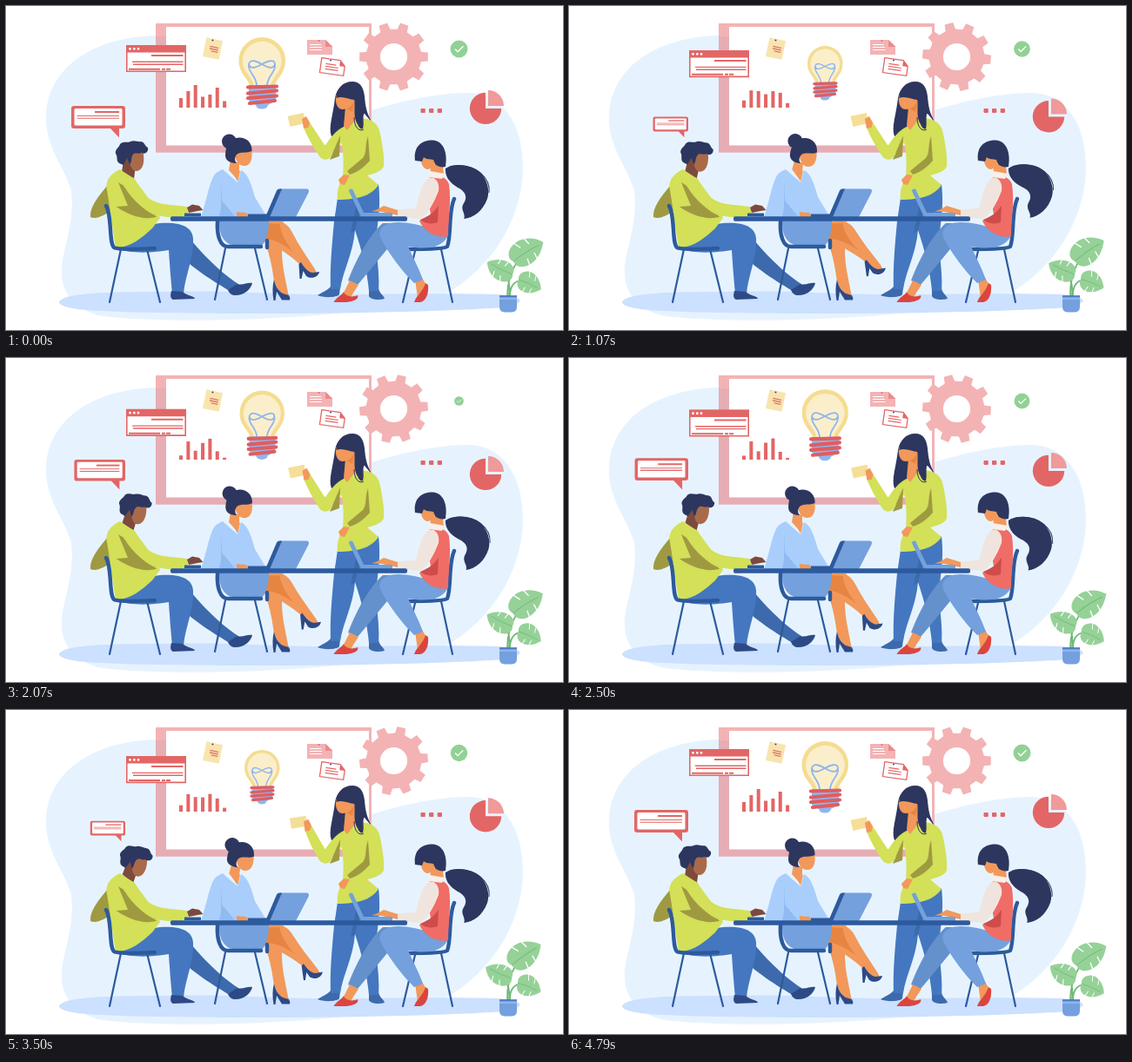
Write an HTML page that moves like this. It is 640 px wide and 373 px high and loops after 4.87 s.

```html
<!DOCTYPE html>
<html lang="en">
<head>
<meta charset="utf-8">
<title>Team meeting</title>
<style>
html, body { margin: 0; width: 100%; height: 100%; overflow: hidden; background: #fff; }
svg { display: block; width: 100%; height: 100%; }
.navy { fill: #2d365f; }
.skin { fill: #f2985a; }
.tan { fill: #e68542; }
.lime { fill: #d3e058; }
.olive { fill: #9f9a41; }
.red { fill: #e36666; }
.pink { fill: #f3b3b4; }
.sky { fill: #74a0dd; }
.blue { fill: #4477bf; }
.deep { fill: #3c6aac; }
.ink { fill: #2d5a9d; }
.shoe { fill: #2d4a86; }
.white { fill: #fff; }
.frame, .thin, .rule { fill: none; stroke: #2d5a9d; stroke-linecap: round; stroke-linejoin: round; }
.frame { stroke-width: 4.4; }
.thin { stroke-width: 2.2; }
.rule { stroke: #e36666; stroke-linecap: butt; }
</style>
</head>
<body>
<svg viewBox="0 0 640 373" preserveAspectRatio="none">
  <defs>
    <g id="leaf">
      <path fill="#96d198" d="M0 0C-5-9 6-17 18-15C28-13 35-6 39 2C31 10 21 15 10 13C2 11-1 6 0 0Z"/>
      <path fill="none" stroke="#fff" stroke-width="1.3" stroke-linecap="round" d="M12-16L15-8M24-14L25-6M12 14L14 7M23 12L24 6"/>
      <path fill="none" stroke="#71b878" stroke-width=".9" d="M0 0Q18-1 33 2"/>
    </g>
  </defs>

  <path fill="#e6f3ff" d="M46 130C46 72 98 36 172 34C270 30 350 140 420 120C455 109 495 100 530 100C574 100 594 140 594 185C594 234 568 296 503 333C420 360 200 368 110 357C70 348 60 320 65 292C70 268 80 236 74 209C64 182 46 160 46 130Z"/>
  <path fill="#cce0ff" d="M61 341C65 330 120 329 180 329C280 327 300 333 400 332C470 331 530 331 565 332C600 334 600 345 560 348C480 352 380 354 300 354C200 354 90 353 72 347C64 345 61 343 61 341Z"/>

  <path class="white" d="M183 23H418V161H183Z"/>
  <path class="pink" d="M172 20H420V168H417V24H184V35H172Z"/>
  <path fill="#e6adb4" d="M172 35H184V160.500H419V168.700H172Z"/>

  <path id="gear" class="pink" fill-rule="evenodd"/>
  <circle class="white" cx="445.500" cy="58.500" r="15.600"/>

  <g id="check">
    <circle r="10" fill="#92d195"/>
    <path fill="none" stroke="#fff" stroke-width="1.400" d="M-4.500 0L-1.500 3.200L5-3.200"/>
  </g>

  <g id="window">
    <path class="white" stroke="#e36666" stroke-width="1.600" d="M138.800 46H206.200V75.300H138.800Z"/>
    <path class="red" d="M138 45H207V53.500H138Z"/>
    <path stroke="#fff" stroke-width="2.800" stroke-linecap="round" d="M142.500 49.300h.01M147.300 49.300h.01M152 49.300h.01"/>
    <path class="rule" stroke-width="2" d="M167 57H203.500M141 72.800H177M179 72.800H183M184 72.800H189"/>
    <path class="rule" stroke-width="1.400" d="M145 64.300H203.500M146 67.200H203.500"/>
  </g>

  <g id="bubble">
    <path class="red" d="M119 140H130V151.500Z"/>
    <rect class="red" x="75" y="115" width="62" height="26" rx="3"/>
    <rect class="white" x="78.500" y="118" width="55" height="19.500" rx="1.500"/>
    <path class="rule" stroke-width="2" d="M102 122H130"/>
    <path class="rule" stroke-width="1.100" d="M81.500 126.500H130M81.500 129.200H130"/>
  </g>

  <g id="bars" class="red"></g>

  <g transform="rotate(12 237 49)">
    <path fill="#f8e5ae" d="M228 38H247V60H228Z"/>
    <path class="rule" stroke-width="1.200" d="M234 47H244M234 49.500H244M236 52H244"/>
    <circle cx="235.500" cy="39.500" r="1" class="navy"/>
  </g>
  <path class="pink" d="M346 39H367L375 47V56H346Z"/>
  <path fill="#e98a8b" d="M367 39V47H375.500Z"/>
  <path stroke="#fff" d="M349 44.500H362M349 47.500H363M349 50.500H363"/>
  <circle cx="359.500" cy="40" r=".9" class="red"/>
  <g transform="rotate(8 375 70)">
    <path class="white" stroke="#e36666" stroke-width="1.300" d="M361.500 61.500H383L389 67.500V78.500H361.500Z"/>
    <path class="red" d="M383 61L389.500 68H383Z"/>
    <path class="rule" stroke-width="1.200" d="M367 67.500H379M367 70.500H382M367 73.500H382"/>
    <circle cx="372" cy="63" r=".9" class="navy"/>
  </g>

  <g id="bulb">
    <path fill="#f4dc91" d="M280 93C280 84 267.500 79 267.500 62.700A26.700 26.700 0 0 1 321 62.700C321 79 309 84 309 93Z"/>
    <path fill="#fbefcb" d="M285 93C284 82 272 77 272 63A22.300 22.300 0 0 1 316.600 63C316.600 77 305 82 304 93Z"/>
    <path fill="none" stroke="#8fb5ef" stroke-width="1.800" d="M288 92C288 80 277 76 279 67C281 60 289 64 294 67C299 70 307 74 309 67C309 60 299 64 294 67C289 70 281 74 279 67M309 67C311 76 300 80 300 92"/>
    <path fill="#8fb5ef" d="M279 91H310V109L301 114Q300 118.500 294 118.500T287 114L279 109Z"/>
    <path fill="none" stroke="#e05d5f" stroke-width="4.200" stroke-linecap="round" d="M278 93.500L311 92.500M278 100.500L311 97.500M278 106L311 103.500M280 112L309 109"/>
  </g>

  <g class="red">
    <rect x="476.500" y="118" width="5.300" height="5" rx="1"/>
    <rect x="486" y="118" width="5.300" height="5" rx="1"/>
    <rect x="495.700" y="118" width="5.300" height="5" rx="1"/>
  </g>
  <g id="pie">
    <path class="red" d="M551 118V99.700A18.200 18.200 0 1 0 569.200 118Z"/>
    <path fill="#f09a9a" d="M554 115V97A18 18 0 0 1 572 115Z"/>
  </g>

  <g id="plant">
    <path fill="none" stroke="#71b878" stroke-width="1.800" d="M576 334C576 318 581 304 588 293M578 334C580 320 576 309 569 304M579 334C579 322 585 314 596 317"/>
    <use href="#leaf" transform="translate(583 294) rotate(-36) scale(1.050)"/>
    <use href="#leaf" transform="translate(582 309) rotate(203) scale(.83)"/>
    <use href="#leaf" transform="translate(589 315) rotate(20) scale(.72 .85)"/>
  </g>
  <path class="sky" d="M567 334H587V346Q587 352.500 581 352.500H573Q567 352.500 567 346Z"/>
  <path stroke="#4477bf" stroke-width="1.600" d="M567 334H587"/>
  <path stroke="#a9cdfb" d="M567 337H587"/>

  <!-- seated man -->
  <path class="olive" d="M117 206C105 220 96 232 97 243C104 246 113 241 121 235Z"/>
  <path class="deep" d="M180 275L207 262C220 280 246 307 267 320L257 328C235 315 207 297 194 280Z"/>
  <path class="shoe" d="M255 327L266 320C272 322 277 318 283 319C281 327 273 333 264 333C259 333 257 331 255 327Z"/>
  <g id="manHead">
    <path fill="#7c4a3d" d="M136 172L149 184L147 199L133 191Z"/>
    <path fill="#a96a4a" d="M141 167L157 166C160 178 158 189 150 190C144 190 141 182 141 167Z"/>
    <path class="navy" d="M130 181C126 178 129 174 126 170C125 165 130 163 131 159C135 155 139 158 143 156C148 154 152 157 155 156C160 157 159 161 163 163C164 168 160 171 156 169C151 171 148 168 146 171C143 174 145 181 142 182L139 175L135 183Z"/>
  </g>
  <path class="blue" d="M126 278C140 262 160 252 177 250C197 249 214 252 215 268C216 290 206 310 204 331H191C189 310 188 297 187 281C170 284 140 286 126 278Z"/>
  <path class="shoe" d="M190 328L203 329C209 334 217 334 217 337L192 338C188 336 189 332 190 328Z"/>
  <path class="lime" d="M131 188C122 192 113 200 116 212C120 235 122 256 126 278C142 279 156 267 168 256L177 244C170 226 151 206 148 199C142 195 136 192 131 188Z"/>
  <path class="olive" d="M129 203L150 216L173 243C157 247 139 240 127 231L140 230Z"/>
  <path class="lime" d="M145 197C151 214 164 225 181 228L208 231L210 241C195 245 180 243 169 240C154 232 140 217 133 203Z"/>
  <path fill="#7c4a3d" d="M208 232L214 228.500L222 230L226.500 235L220 236L210 238Z"/>
  <path class="frame" d="M115 230C122 241 118 272 124 278Q128 281 171 279"/>
  <path class="thin" d="M132 280L119 341M162 280L177 341"/>
  <path class="ink" d="M205 238.500H224V242H205Z"/>

  <!-- seated woman with bun -->
  <path class="skin" d="M296 248H318C323 254 317 268 317 280C317 298 320 308 322 320L325 335L317 334L308 318C306 300 302 282 296 268Z"/>
  <path class="shoe" d="M308 315C309 322 313 328 318 331L325 333Q327 336 326 338.500L317 338.500L311 329L309.500 339H307.500C306 330 306 322 308 315Z"/>
  <g id="shin">
    <path class="skin" d="M296 251C312 245 322 248 328 259C336 275 346 289 355 303L357 308L347 308C333 290 314 280 298 268Z"/>
    <path class="tan" d="M298 250L315 251C315 260 321 272 330 283C320 275 308 268 298 268Z"/>
    <path class="shoe" d="M336.500 297L339 295C343 302 347 306 352 307L360 306C359 312 351 315 345 311L341.500 305L339.500 314L337.500 314Z"/>
  </g>
  <path class="sky" d="M245 246C244 264 251 276 266 276H294C300 269 302 258 302 246Z"/>
  <path fill="#a9cefb" d="M249 188L266 203L270 189C278 193 282 205 286 220L300 243H224C230 226 233 205 239 195C242 191 246 189 249 188Z"/>
  <path fill="#90bbf2" d="M247 202L248 224L264 243H245L247 232Z"/>
  <path class="skin" d="M257 185L269 190L266 202Z"/>
  <g id="bunHead">
    <path class="skin" d="M258 177L268 181V193L266 200L256 189Z"/>
    <path class="skin" d="M262 168L282 165C284 176 281 184 274 184C268 184 264 180 262 168Z"/>
    <path class="navy" d="M252 172C252 158 260 151.500 268 151.500C278 151.500 283 159 282.500 167C277 170 270 167 265 171C262 175 263 179 265 181C256 181 252 177 252 172Z"/>
    <circle class="navy" cx="256.500" cy="156" r="8.500"/>
  </g>
  <path class="skin" d="M265 237L276 238L282 243H265Z"/>
  <path class="frame" d="M243 248C242 264 246 277 255 277H293M300 270V278"/>
  <path class="thin" d="M252 279L240 338M286 279L300 338"/>
  <path class="ink" d="M278 239.500H302V243H278Z"/>
  <path class="sky" d="M301 243L315 210.500H346Q349 211 347.500 215L333 243Z"/>
  <path class="ink" d="M298 243L311 212.500Q312 210.500 314 210.500H317L303 243Z"/>

  <!-- standing woman -->
  <path class="deep" d="M373 323L384 324L383 332C380 336 364 336 358 333C362 330 369 328 373 323ZM417 325H428C429 331 434 333 435 337C428 339 419 338 417 334Z"/>
  <path class="blue" d="M381 221C398 225 418 218 428 205C431 230 427 248 426 262C424 285 430 305 428 328H417C415 305 409 282 401 258C399 285 387 305 384 326H373C372 300 375 270 377 248Z"/>
  <path class="deep" d="M403 226L396 262L401 258L406 240Z"/>
  <path class="navy" d="M398 87C387 87 380 95 378 106C376 125 370 140 374 150C384 149 391 142 394 130L412 124L422 136C414 124 413 115 412 104C411 94 407 87 398 87Z"/>
  <path class="lime" d="M388 139L404 129C414 129 425 131 429 143C433 160 435 176 434 185C431 191 420 194 415 195L428 206C420 218 405 223 381 223C380 212 382 206 387 200C388 182 388 168 385 157L378 171L364 165C372 152 379 143 388 139Z"/>
  <path class="olive" d="M416 150C412 160 415 169 410 175L392 190L395 194C405 191 412 185 418 178ZM384 149L383 173L372 177Z"/>
  <path class="skin" d="M390 116L402 106V130L392 143L388 138Z"/>
  <path class="tan" d="M390 117L401 107L398 122Z"/>
  <path class="skin" d="M379 103L399 97L401 108C398 115 393 119 387 119C381 119 378 113 379 103Z"/>
  <path class="navy" d="M379 106C387 103 395 108 400 108C402 112 398 127 404 136C406 142 410 142 410 141C412 135 409 130 412 120L409 98L394 94L381 98Z"/>
  <path fill="none" stroke="#2d365f" d="M400 128C400 140 406 145 411 142"/>
  <path class="skin" d="M382 200L388 194L395 195L389 206L384 205Z"/>
  <g id="arm">
    <path class="lime" d="M342 140L349 134L366 160C372 162 378 170 372 175C368 178 363 177 360 173C352 161 346 150 342 140Z"/>
    <path fill="#f5de97" d="M323.500 127L342 123L344 135L326.500 139Z"/>
    <path class="skin" d="M340 130L345 127L349 134L347.500 140L342 141Z"/>
  </g>

  <!-- seated woman with ponytail -->
  <path class="thin" d="M470 282L456 341M500 280L513 341"/>
  <path class="frame" d="M515 222C508 237 512 265 507 277Q504 280 462 280"/>
  <path fill="#6491cc" d="M433 250L462 250C442 275 420 302 404 321L393 316C402 292 417 264 433 250Z"/>
  <path class="skin" d="M395 316L405 321L396 335L387 332Z"/>
  <path fill="#da453d" d="M376.500 341C380 335 386 333 388 329C390 334 397 336 404 333C406 337 400 340 391 341Z"/>
  <path class="skin" d="M470 315L478 313L483 321L473 336Z"/>
  <path class="sky" d="M508 264C492 258 472 249 450 249C435 249 427 257 430 266C440 286 455 305 469 319L479 315C474 301 468 290 462 277C480 280 501 280 508 264Z"/>
  <path fill="#da453d" d="M469 341C471 334 479 329 482 319L485 321C486 332 482 340 476 341Z"/>
  <path fill="#ef6d66" d="M487 196C496 193 506 197 509 205C512 225 508 245 508 265C495 268 480 260 475 247L488 240L484 215Z"/>
  <path fill="#cf4c4b" d="M476 246C485 243 491 238 497 230L496 249C488 252 481 250 476 246Z"/>
  <path fill="#f0e5de" d="M484 199C492 195 499 202 497 213C492 226 485 239 476 245L449 243V234L471 233C474 220 477 207 484 199Z"/>
  <path class="skin" d="M489 181L502 184L503 196L487 194Z"/>
  <path fill="#f8eeea" d="M487 190L504 193L501 199L485 197Z"/>
  <g id="tail">
    <path class="navy" d="M505 187C513 181 528 182 540 188C551 194 557 210 553 222C548 236 537 244 526 245C529 239 521 235 526 227C531 219 527 213 519 209C510 204 504 196 505 187Z"/>
    <path fill="none" stroke="#2d365f" d="M515 184C541 181 557 199 555 215"/>
  </g>
  <path class="skin" d="M476 173L493 171C494 182 490 188 484 188C479 187 477 182 476 173Z"/>
  <path class="navy" d="M470 178C468 161 478 154.500 490 154.500C502 155 508 168 505 185C501 186 496 185 493 182L491 177C486 176 483 177 480 174L478 179Z"/>
  <path class="skin" d="M450 235L434 230L427 234L420 236.500L432 237L450 241Z"/>
  <path class="sky" d="M394 213Q394 210 398 210.500L411 238H444V243H408Z"/>
  <rect class="ink" x="189" y="242.200" width="272" height="5.600" rx="2"/>
</svg>
<script>
const LOOP = 4870, CYCLE = 4790;
const KEYS = [0, 640, 1570, 2070, 2930, 4140, CYCLE];
const $ = id => document.getElementById(id);
const set = (id, value) => $(id).setAttribute('transform', value);
const mix = (a, b, k) => a + (b - a) * k;
const wave = (t, n) => (1 - Math.cos(2 * Math.PI * n * t / CYCLE)) / 2;
const turn = (id, deg, x, y) => set(id, `rotate(${deg} ${x} ${y})`);
const zoom = (id, s, x, y) => set(id, `translate(${x} ${y}) scale(${s}) translate(${-x} ${-y})`);

// Smooth pose through values at the shared key times.
function pose(t, values) {
  if (t >= CYCLE) return values[6];
  let i = 0;
  while (t >= KEYS[i + 1]) i++;
  const k = (t - KEYS[i]) / (KEYS[i + 1] - KEYS[i]);
  return mix(values[i], values[i + 1], k * k * (3 - 2 * k));
}

function gearPath(teeth) {
  const step = 2 * Math.PI / teeth;
  const corners = [[32, -.29], [39.6, -.2], [39.6, .2], [32, .29]];
  let d = '';
  for (let i = 0; i < teeth; i++) {
    for (const [r, o] of corners) {
      const a = (i + o) * step;
      d += `${d ? 'L' : 'M'}${(445.5 + r * Math.cos(a)).toFixed(2)} ${(58.5 + r * Math.sin(a)).toFixed(2)}`;
    }
  }
  return d + 'Z';
}
$('gear').setAttribute('d', gearPath(10));

const tops = [[106, 112.5], [98, 96], [91, 107.5], [104.5, 97.5], [102, 92.5], [94, 108], [109.5, 115]];
const bars = tops.map((_, i) => {
  const bar = document.createElementNS('http://www.w3.org/2000/svg', 'rect');
  bar.setAttribute('x', 199 + i * 8.35);
  bar.setAttribute('width', 4);
  return $('bars').appendChild(bar);
});

function draw(t) {
  const slow = wave(t, 1), mid = wave(t + 15, 2), fast = wave(t + 25, 4);

  zoom('bubble', 1 - .355 * mid, 137, 151);
  zoom('bulb', 1 - .245 * mid, 294.3, 77.3);
  set('check', `translate(520.5 49.5) scale(${mix(1, .07, fast)})`);
  set('window', `translate(0 ${14.5 * slow})`);
  set('pie', `translate(0 ${pose(t, [0, 4.5, 15.5, 16, 8, 0, 0])})`);
  turn('gear', 184 * slow, 445.5, 58.5);
  bars.forEach((bar, i) => {
    const y = mix(tops[i][0], tops[i][1], slow);
    bar.setAttribute('y', y);
    bar.setAttribute('height', 117 - y);
  });

  turn('plant', -2.6 * mid, 577, 333);
  turn('manHead', pose(t, [0, 6, 4, 9, 7, 16, 0]), 142, 194);
  turn('bunHead', 5.5 * mid, 264, 192);
  turn('shin', -4.5 * (1 - (1 - mid) ** 4), 304, 256);
  turn('arm', pose(t, [0, 3, -4, .8, .8, 6, 0]), 367, 168);
  turn('tail', pose(t, [0, -3, -4, -2.5, -.5, .5, 0]), 507, 188);
}

const start = performance.now();
function tick() {
  draw((performance.now() - start) % LOOP);
  requestAnimationFrame(tick);
}
draw(0);
requestAnimationFrame(tick);
</script>
</body>
</html>
```
